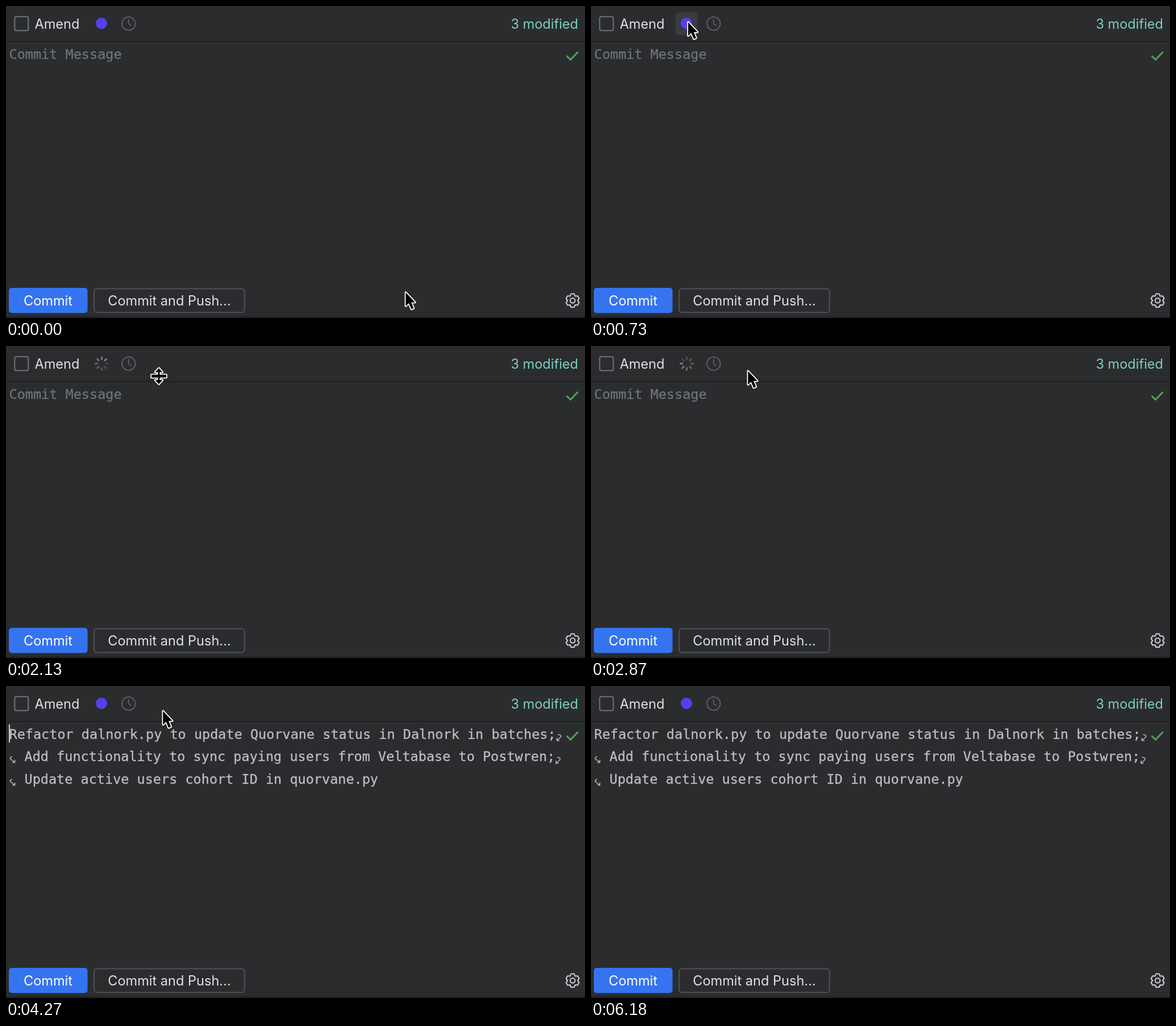
These frames come from a looping animation (1019 by 549 pixels, 6300 ms). An HTML page:

```html
<!DOCTYPE html>
<html lang="en">
<head>
<meta charset="utf-8">
<title>Commit panel</title>
<style>
  html, body { margin: 0; width: 100%; height: 100%; overflow: hidden; background: #2b2c2e; }
  svg { display: block; width: 100%; height: 100%; }
  text { font: 23.55px Inter, sans-serif; fill: #dfe1e5; white-space: pre; }
  .mono { font: 23.5px "DejaVu Sans Mono", monospace; fill: #bcbec4; stroke: #bcbec4; stroke-width: .3; }
  .line { fill: none; stroke-width: 2; stroke-linecap: round; stroke-linejoin: round; }
  .pointer path { fill: #000; stroke: #fff; stroke-width: 3.6; paint-order: stroke; stroke-linejoin: round; }
</style>
</head>
<body>
<svg viewBox="0 0 1019 549">
  <rect y="61.5" width="1019" height="2" fill="#1e1f22"/>
  <rect y="546" width="1019" height="3" fill="#222329"/>

  <rect class="line" x="15.3" y="18.8" width="24" height="24.4" rx="3" stroke="#6f737a"/>
  <text x="50.5" y="39.7">Amend</text>
  <rect id="hover" x="148.5" y="11" width="40" height="40" rx="6" fill="#393b3f"/>
  <circle id="logo" cx="168" cy="30.5" r="10" fill="#5540ee"/>
  <g id="spinner" transform="translate(168.5 31)" stroke="#9a9da3" stroke-width="3"></g>
  <g class="line" stroke="#5a5d62">
    <circle cx="215.8" cy="31" r="11.7"/>
    <path d="M215.8 24v7.5l4.2 3"/>
  </g>
  <text x="1007" y="39.7" text-anchor="end" style="fill:#7dcfc3">3 modified</text>

  <text id="hint" class="mono" x="5.5" y="92.5" style="fill:#6f737a;stroke:#6f737a">Commit Message</text>
  <g id="message">
    <text class="mono" x="5.5" y="92.5">Refactor dalnork.py to update Quorvane status in Dalnork in batches;</text>
    <text class="mono" x="32.5" y="132.3">Add functionality to sync paying users from Veltabase to Postwren;</text>
    <text class="mono" x="32.5" y="172">Update active users cohort ID in quorvane.py</text>
    <g class="line" stroke="#b4b6bc" style="stroke-width:1.6">
      <path id="tail" d="M972 85.5c5 .5 6 3 3 5.500l-5.500 5m0-4v4h4"/>
      <path id="lead" d="M10 124.500c-4 2-3 4.500 0 5.500l5.500 4.500m0-4v4h-4"/>
      <use href="#tail" x="-1.5" y="40"/>
      <use href="#lead" y="40"/>
    </g>
  </g>
  <rect id="caret" x="5" y="67.5" width="2" height="32" fill="#ced0d6"/>
  <path class="line" d="M987.500 88.500l6 6 12.500-13" stroke="#57a05c" style="stroke-width:3"/>

  <rect x="5" y="496" width="138.5" height="44.3" rx="5" fill="#3574f0"/>
  <text x="74" y="527" text-anchor="middle" style="fill:#fff">Commit</text>
  <rect class="line" x="155" y="497.5" width="264.7" height="41.7" rx="5" stroke="#4e5157"/>
  <text x="287.5" y="527" text-anchor="middle">Commit and Push...</text>
  <g class="line" transform="translate(997.2 518.3)" stroke="#ced0d6">
    <path id="gear"/>
    <circle r="4.3"/>
  </g>

  <g id="pointer" class="pointer">
    <path id="arrow" d="M0 0V24L5.500 19 10 29.500 14 27.800 9.800 17.500H16.500Z"/>
    <path id="resize" d="M0-14L6.500-7H1.500V-2.500H13V2.500H1.500V7H6.500L0 14-6.500 7H-1.500V2.500H-13V-2.500H-1.500V-7H-6.500Z"/>
    <path id="beam" d="M-6-14.500h3.500L0-12.500 2.500-14.500H6v2H3.500L1-10V10L3.500 12.500H6v2H2.500L0 12.500-2.500 14.500H-6v-2H-3.500L-1 10V-10L-3.500-12.500H-6Z"/>
  </g>
</svg>
<script>
const LOOP = 6300, LOAD = 950, DONE = 4270;
const $ = id => document.getElementById(id);
const show = (id, on) => $(id).style.display = on ? "" : "none";
const clamp = x => Math.max(0, Math.min(1, x));

// Pointer stops: time, x, y
const stops = [
  [0, 703.5, 504], [70, 703.5, 504], [690, 171, 28.5], [1000, 171, 28.5], [1400, 169, 27],
  [1650, 169, 27], [2130, 269, 53], [2420, 276.3, 44], [LOOP, 276.3, 44]
];

function pointerAt(t) {
  const i = stops.findIndex(s => s[0] > t);
  const [t0, x0, y0] = stops[i - 1], [t1, x1, y1] = stops[i];
  const p = (t - t0) / (t1 - t0), e = p * p * (3 - 2 * p);
  return [x0 + (x1 - x0) * e, y0 + (y1 - y0) * e];
}

const polar = (deg, r) => {
  const a = deg * Math.PI / 180;
  return [r * Math.sin(a), -r * Math.cos(a)].map(v => v.toFixed(2)).join(" ");
};

const gear = [];
for (let a = 0; a < 360; a += 60) gear.push(polar(a - 13, 12), polar(a + 13, 12), polar(a + 30, 8.9));
$("gear").setAttribute("d", "M" + gear.join("L") + "Z");

for (let i = 0; i < 8; i++)
  $("spinner").innerHTML += `<path d="M${polar(i * 45, 6.5)}L${polar(i * 45, 12.3)}"/>`;

function draw(t) {
  const [x, y] = pointerAt(t);
  const loading = t >= LOAD && t < DONE, done = t >= DONE;
  show("logo", !loading);
  show("spinner", loading);
  show("hint", !done);
  show("message", done);
  show("caret", done && (t < 4930 || (t >= 5470 && t < 6000)));
  show("hover", x > 148 && x < 189 && y > 11 && y < 51);

  const step = Math.floor(t / 125);
  [...$("spinner").children].forEach((spoke, i) =>
    spoke.style.opacity = 0.72 - 0.07 * ((step - i + 80) % 8));

  const beam = y > 66 && y < 492;
  const resize = !beam && x > 230 && y > 46 && y < 66;
  show("beam", beam);
  show("resize", resize);
  show("arrow", !beam && !resize);
  $("pointer").setAttribute("transform", `translate(${x} ${y})`);
  $("pointer").style.opacity = 1 - clamp((t - 4870) / 330);
}

function tick() {
  draw(performance.now() % LOOP);
  requestAnimationFrame(tick);
}
tick();
</script>
</body>
</html>
```
